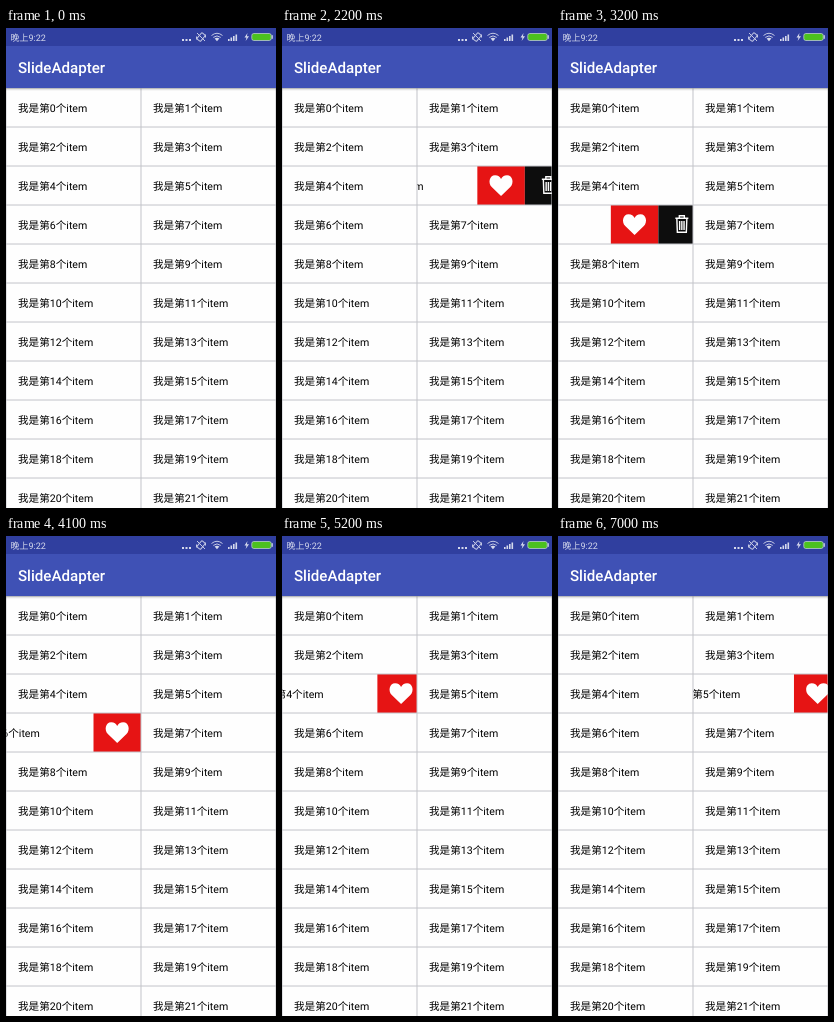
These frames come from a looping animation (270 by 480 pixels, 7.1 s). An HTML page:

```html
<!DOCTYPE html>
<html lang="zh-CN">
<head>
<meta charset="utf-8">
<title>SlideAdapter</title>
<style>
  html, body { margin: 0; width: 100%; height: 100%; overflow: hidden; background: #fefefe; }
  svg { display: block; }
  text {
    font-family: Roboto, "Noto Sans CJK SC", "Noto Sans CJK", sans-serif;
    white-space: pre;
    text-rendering: geometricPrecision;
  }
  .label { font-size: 10.6px; fill: #000; }
  .title { font-size: 15.1px; font-weight: 500; fill: #fff; }
  .clock { font-size: 9px; fill: #d5d9ec; }
  .line { fill: none; stroke: #c3c8e4; stroke-width: 1; }
  .bin { fill: none; stroke: #fff; stroke-width: 1.4; }
  .border { fill: none; stroke: #c2c3c9; stroke-width: 1; }
</style>
</head>
<body>
<svg id="stage" width="270" height="480" viewBox="0 0 270 480">
  <defs>
    <linearGradient id="shade" x2="0" y2="1">
      <stop stop-color="#000" stop-opacity=".2"/>
      <stop offset="1" stop-color="#000" stop-opacity="0"/>
    </linearGradient>
    <g id="menu">
      <rect width="47.5" height="39" fill="#e61414"/>
      <rect x="47.5" width="48" height="39" fill="#0d0d0d"/>
      <path transform="translate(23.7 19.3)" fill="#fff"
        d="M0 10.7L-9.3 1.8C-13.3-2.2-11.7-10-6-10C-3-10-1-8.5 0-6.2C1-8.5 3-10 6-10C11.7-10 13.3-2.2 9.3 1.8Z"/>
      <path transform="translate(71 19)" class="bin"
        d="M-6.5-5.8H6.5M-2.5-6V-8.3H2.5V-6M-5-5.5L-4.5 8.3H4.5L5-5.5M-2.2-3V6M0-3V6M2.2-3V6"/>
    </g>
  </defs>
  <rect width="270" height="480" fill="#fefefe"/>
  <g id="list"></g>

  <rect y="60" width="270" height="3" fill="url(#shade)"/>
  <rect width="270" height="60" fill="#3f51b5"/>
  <rect width="270" height="18" fill="#303f9f"/>
  <text class="title" x="12" y="45">SlideAdapter</text>
  <text class="clock" x="4.5" y="12.7">晚上9:22</text>

  <g fill="#d5d9ec">
    <path d="M176 11h2v2h-2zM179.500 11h2v2h-2zM183 11h2v2h-2z"/>
    <path d="M211 13.200L208.600 10.600Q211 8.700 213.400 10.600Z"/>
    <path d="M222 13V11h1.600v2zM224.500 13V9.500h1.600V13zM227 13V8h1.600v5zM229.500 13V6.500h1.600V13z"/>
    <path d="M241.500 5L238.500 9.600H240.500L239.600 13L243 8.300H240.900Z"/>
    <rect x="265.500" y="7.200" width="1.300" height="3.600"/>
  </g>
  <g class="line">
    <rect x="192.800" y="5" width="4.600" height="8" rx="1" transform="rotate(40 195 9)"/>
    <path d="M190.500 8.500V11.500M199.500 6.500V9.500M191 5L199 13"/>
    <path d="M205.500 7.500Q211 3 216.500 7.500M207.300 9.400Q211 6.400 214.700 9.400"/>
  </g>
  <rect x="245.800" y="5.500" width="19.400" height="7" rx="2" fill="#4cc11f" stroke="#b9c9cf" stroke-width=".8"/>
</svg>

<script>
const LOOP = 7100, STEP = 100, MENU_WIDTH = 95, ROW = 39, COL = 135, TOP = 60;

// item, open start, open duration, close start, close duration (ms)
const slides = [
  [5, 1730, 670, 2800, 137],
  [6, 2900, 390, 4020, 160],
  [7, 4100, 300, 4930, 150],
  [4, 5000, 450, 5820, 160],
  [5, 5900, 300, 6860, 235],
];

// Each cell clips its border to half a pixel, so neighbours share a soft line.
const list = document.getElementById('list');
list.innerHTML = Array.from({ length: 22 }, (_, i) => `
  <svg x="${i % 2 * COL}" y="${TOP + (i >> 1) * ROW}" width="${COL}" height="${ROW}" overflow="hidden">
    <g class="track">
      <text class="label" x="12" y="23.700">我是第${i}个item</text>
      <use href="#menu" x="${COL}"/>
    </g>
    <rect class="border" width="${COL}" height="${ROW}"/>
  </svg>`).join('');
const tracks = list.querySelectorAll('.track');

function ease(time, start, duration) {
  const p = Math.min(1, Math.max(0, (time - start) / duration));
  return p * p * (3 - 2 * p);
}

function draw(now) {
  const time = Math.floor(now % LOOP / STEP) * STEP;
  const offsets = {};
  for (const [item, openAt, openFor, closeAt, closeFor] of slides) {
    const shown = ease(time, openAt, openFor) - ease(time, closeAt, closeFor);
    offsets[item] = (offsets[item] || 0) + MENU_WIDTH * shown;
  }
  for (const item in offsets) {
    tracks[item].setAttribute('transform', `translate(${-offsets[item]} 0)`);
  }
}

const begin = performance.now();
function tick() {
  draw(performance.now() - begin);
  requestAnimationFrame(tick);
}
tick();
</script>
</body>
</html>
```
